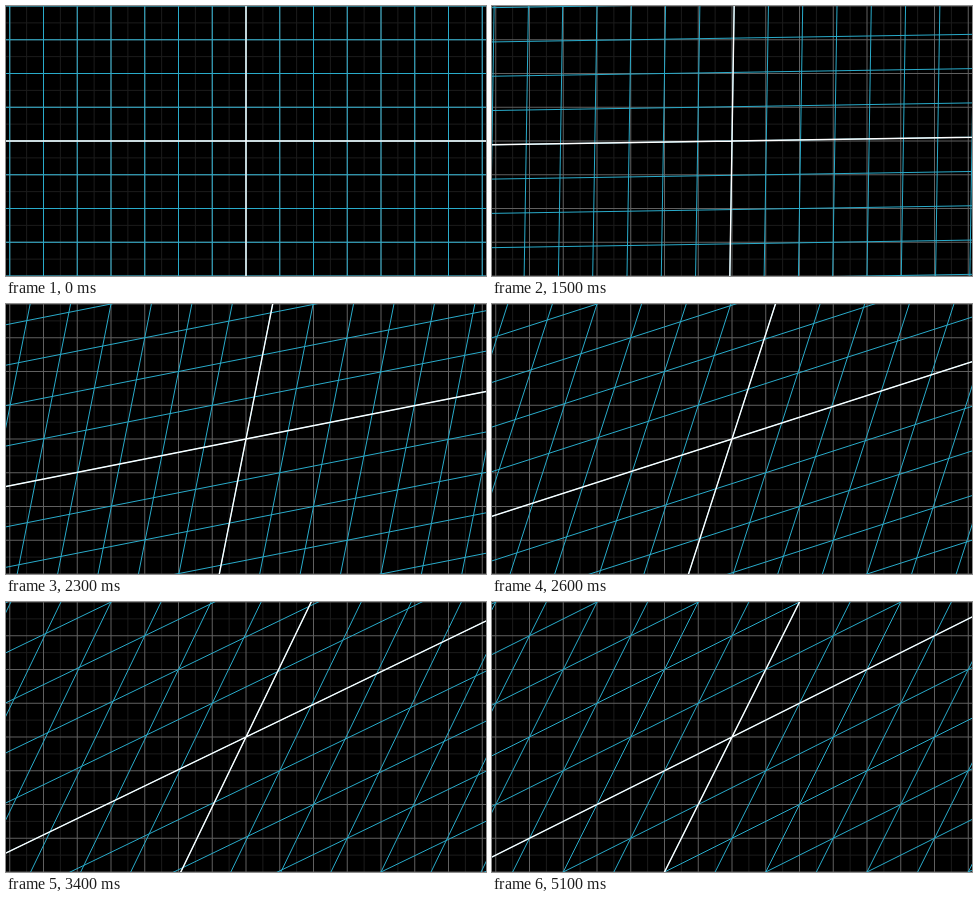
Recreate the animation shown at these times as an HTML page with a canvas. Size 480 by 270 pixels, loop 5200 ms.

```html
<!DOCTYPE html>
<html lang="en">
<head>
<meta charset="utf-8">
<title>Linear transformation of the plane</title>
<style>
  html, body { margin: 0; width: 100%; height: 100%; overflow: hidden; background: #000; }
  canvas { display: block; }
</style>
</head>
<body>
<canvas id="stage" width="480" height="270"></canvas>
<script>
const ctx = document.getElementById('stage').getContext('2d');
const UNIT = 33.75, REACH = 24;
const LOOP = 5200, STEP = 100, START = 1130, DURATION = 3000;

const sigmoid = x => 1 / (1 + Math.exp(-x));

// Normalised logistic easing from 0 to 1
function smooth(t) {
  const edge = sigmoid(-5);
  const u = Math.min(1, Math.max(0, t));
  return (sigmoid(10 * (u - 0.5)) - edge) / (1 - 2 * edge);
}

// Grid lines at start, start + gap, ... on both axes, sheared by the matrix [[1+s, s], [s, 1+s]]
function grid(s, start, end, gap, color, width) {
  const point = (x, y) => [
    240 + UNIT * (x + s * (x + y)),
    135 - UNIT * (y + s * (x + y))
  ];
  ctx.beginPath();
  for (let k = start; k <= end; k += gap) {
    ctx.moveTo(...point(k, -REACH));
    ctx.lineTo(...point(k, REACH));
    ctx.moveTo(...point(-REACH, k));
    ctx.lineTo(...point(REACH, k));
  }
  ctx.strokeStyle = color;
  ctx.lineWidth = width;
  ctx.stroke();
}

function draw(now) {
  const time = Math.floor((now % LOOP) / STEP) * STEP;
  const s = smooth((time - START) / DURATION);
  ctx.fillStyle = '#000';
  ctx.fillRect(0, 0, 480, 270);
  grid(0, -7.5, 7.5, 1, '#1c1c1c', 1);
  grid(0, -8, 8, 1, '#606060', 1);
  grid(s, -8, 8, 1, '#29abca', 1);
  grid(s, 0, 0, 1, '#fff', 1.4);
}

const origin = performance.now();
function tick() {
  draw(performance.now() - origin);
  requestAnimationFrame(tick);
}
tick();
</script>
</body>
</html>
```
